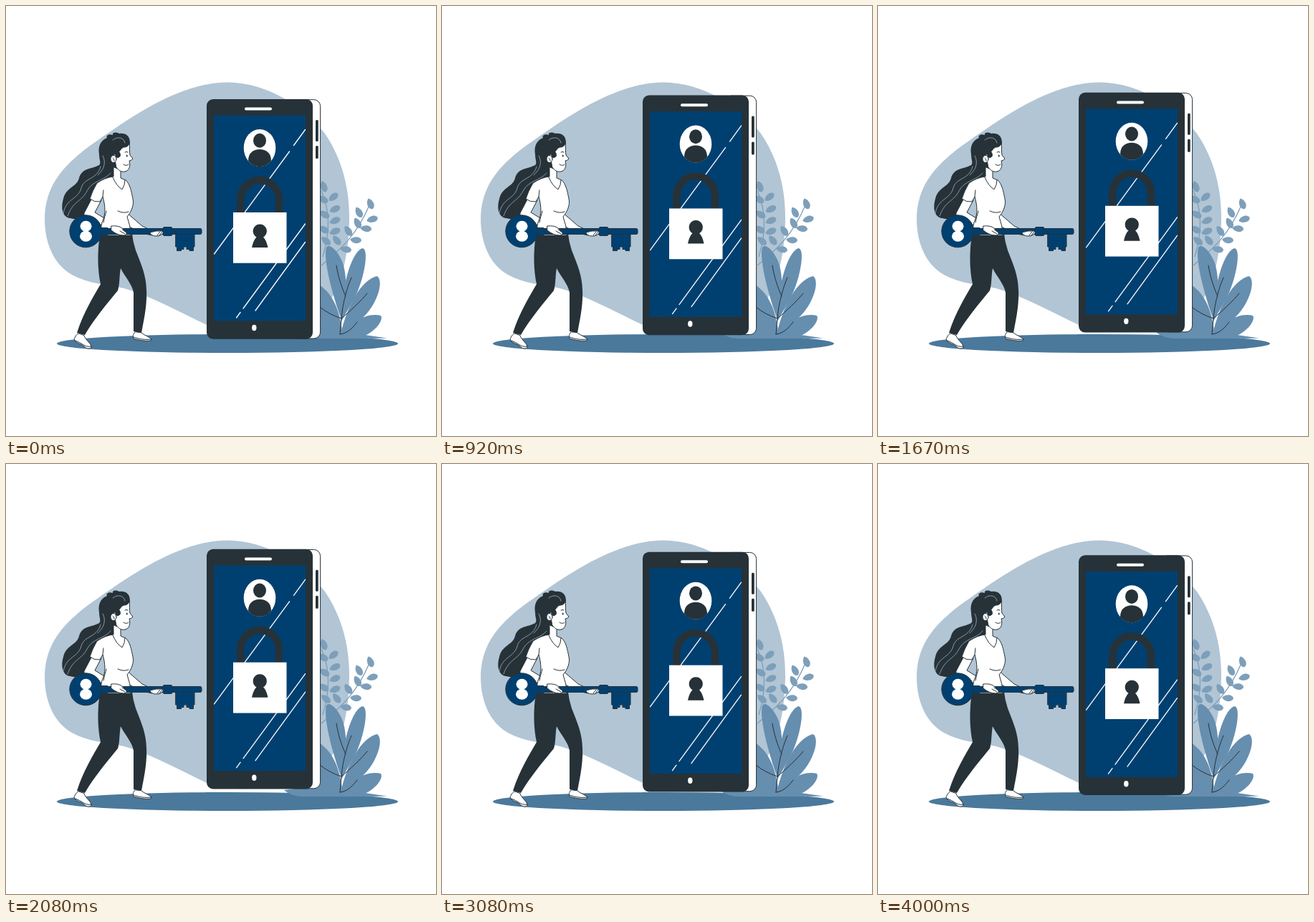
Write an HTML page that moves like this. It is 600x600 px and loops after 4080 ms.

```html
<!DOCTYPE html>
<html lang="en">
<head>
<meta charset="utf-8">
<title>Phone lock</title>
<style>
html, body { margin: 0; width: 100%; height: 100%; overflow: hidden; background: #fff; }
svg { display: block; width: 100%; height: 100%; }
.ink { fill: #263238; }
.navy { fill: #004071; }
.white { fill: #fff; }
.line { fill: none; stroke: #263238; stroke-width: 1; stroke-linecap: round; stroke-linejoin: round; }
.edge { stroke: #263238; stroke-width: 1; stroke-linejoin: round; stroke-linecap: round; }
.leaf { fill: #668eaf; }
.fern { fill: #7d9fba; }
.stem { fill: none; stroke: #7d9fba; stroke-width: 1.3; }
.strand { fill: none; stroke: #b1c5d5; stroke-width: .7; stroke-linecap: round; }
.glare { fill: none; stroke: #fff; stroke-width: 1.3; stroke-linecap: round; }
</style>
</head>
<body>
<svg viewBox="0 0 600 600">
  <path fill="#b1c5d5" d="M54 297C54 247 86 216 130 186C185 147 247 107 309 106.500C365 107 415 140 445 178C470 215 479 255 479 297C478 345 470 395 440 428C400 452 320 462 278 444C240 426 205 406 165 394C140 388 115 388 92 375C66 360 54 330 54 297Z"/>
  <ellipse cx="309" cy="471" rx="238" ry="13" fill="#4a799c"/>

  <g id="fern">
    <path class="stem" d="M440 258Q458 298 442 350M440 362C470 337 490 318 507 278"/>
  </g>
  <g class="leaf">
    <path d="M447 337C443 350 451 390 468 438C475 420 478 375 468 354C461 340 451 331 447 337Z"/>
    <path d="M468 440C467 400 480 345 497 338C508 338 499 385 486 408Z"/>
    <path d="M467 458C478 410 500 380 518 377C529 385 515 425 490 441Z"/>
    <path d="M466 462C480 440 505 427 523 432C528 440 510 460 490 463Z"/>
    <path d="M430 385C450 395 466 415 470 462L430 463Z"/>
    <path d="M388 455Q398 464 415 464L500 464L532 463.500L480 456L440 448Z"/>
  </g>
  <path class="line" d="M466 458L468 436C470 412 477 390 482 379M461 362C463 376 468 392 474 405M438 420Q450 430 468 436C480 426 495 412 504 401M466 458C478 457 486 446 490 441"/>

  <g id="phone">
    <rect class="white edge" x="395" y="130.700" width="43.600" height="333.300" rx="9"/>
    <rect class="ink" x="280" y="130" width="148" height="334.700" rx="9"/>
    <rect class="ink" x="432" y="159" width="3.800" height="30" rx="1.500"/>
    <rect class="ink" x="432" y="195" width="3.800" height="18" rx="1.500"/>
    <rect class="navy" x="290" y="152.700" width="128" height="286.600"/>
    <rect class="white" x="333" y="141.600" width="38" height="4" rx="2"/>
    <ellipse class="white" cx="346.300" cy="449" rx="3.200" ry="4.200"/>
    <path class="glare" d="M417.500 172.500L401.500 194.500M395.500 203L290.500 346M417.500 304L331 422M327 427.500L321.500 435M417.500 329.500L348 425"/>
    <ellipse class="white" cx="354" cy="198" rx="22.300" ry="26"/>
    <ellipse class="ink" cx="354" cy="187.700" rx="9" ry="10"/>
    <path class="ink" d="M338 216C338 205 345 200 354 200S370 205 370 216C366 221.500 360 224 354 224S342 221.500 338 216Z"/>
    <path fill="none" stroke="#263238" stroke-width="10.500" d="M327.300 290V270a26.800 27 0 0 1 53.600 0V290"/>
    <rect class="white" x="317" y="288" width="74.500" height="70.700"/>
    <path class="ink" d="M349.500 322.500A9.600 9.600 0 1 1 359 322.500Q363.500 327 365.500 337H343Q345 327 349.500 322.500Z"/>
  </g>

  <g id="woman">
    <path class="ink" d="M173 191C173 181 167 177 158 178C152 175 148 177 149 180C143 178 139 181 141 184C132 187 128 197 130 207C130 215 133 219 130 222C118 228 106 226 102 240C99 253 84 252 80 269C76 283 79 294 89 296C98 298 105 298 111 293C120 286 123 265 134 252C143 245 152 240 154 226L151 208C160 206 160 198 165 198C170 198 173 196 173 191Z"/>
    <path class="strand" d="M132 224C127 243 109 239 105 254C101 270 84 268 80 289M146 233C137 244 121 243 113 258C106 273 93 272 86 293M149 187C156 181 165 184 166 191M135 209C140 218 137 228 128 236"/>

    <path class="white edge" d="M120 268L109 289Q108 293 114 296L150 314L155 307L124 288L133 271Z"/>
    <path class="white edge" d="M168 288L190 307L207 315L204 320L190 317L164 304Z"/>

    <path class="ink" d="M131 319C127 345 128 370 132 388C121 407 108 428 99 456L110 459C122 438 142 414 156 397C159 388 158 375 160 366C166 378 176 388 178 400L178 454L189 456C193 435 198 413 195.500 389C194 371 186 354 181 341Q177 329 176 318Z"/>
    <path class="white edge" d="M101 457C97 459 96 463 95 465C97 471 106 471 110 476C113 478.500 117 478.500 119 477C120 471 111 467 109 460Z"/>
    <path class="line" d="M96 467C106 469 109 477 119 475"/>
    <path class="white edge" d="M180 455C177 458 177 461 178 464C184 466 194 468 202 467C205 463 195 461 189 456Z"/>
    <path class="line" d="M178 462C186 465 195 466 203 465"/>

    <path class="white edge" d="M150 225V238Q139 239 127 247Q120 259 117 269Q123 274 131 273L135 266C139 280 139 291 134 302L130 320H174Q174 307 169 294C175 287 179 277 177 269C175 259 173 248 167 243L160 240V229Z"/>
    <path class="line" d="M149 239Q154 251 162 256Q166 250 166 243M135 266L136 257M156 286Q164 290 171 287M140 286Q137 296 136 302"/>
    <path class="white edge" d="M151 207C159 206 160 197 165 197Q170 197 172 192C173 197 172 204 173 208L177 213Q175 216 172 216C174 223 172 230 166 231C160 232 157 229 154 225Z"/>
    <ellipse class="white edge" cx="150" cy="213.500" rx="4" ry="5"/>
    <path class="ink" d="M151 203Q160 200 160 209Q157 214 153 211Z"/>
    <path class="line" d="M166 204Q168 202.500 170 204M164 221Q168 224 171 221M149 212Q151 213 151 216"/>
    <ellipse class="ink" cx="168.700" cy="209" rx="1" ry="1.600"/>

    <g class="navy edge">
      <path d="M128 310.500H271Q273 310.500 273 312.500V316.500Q273 318.500 271 318.500H128Z"/>
      <path d="M237 318.500H263V336H261.500V341.500H256V339.500H252V336H248V339.500H244.500V341.500H238.500V336H237Z"/>
      <rect x="219" y="308.500" width="13" height="12" rx="2"/>
      <rect x="129" y="309.500" width="14" height="10" rx="2"/>
      <circle cx="111.300" cy="314.300" r="22.500"/>
    </g>
    <ellipse class="white" cx="111.500" cy="307.300" rx="8" ry="7.500"/>
    <ellipse class="white" cx="111.500" cy="321.300" rx="8.500" ry="7.500"/>

    <path class="white edge" d="M147 307Q157 306 162 310L168 316Q169 320 164 320Q155 320 147 313Z"/>
    <path class="line" d="M159 314L166 318M162 312L168 316"/>
    <path class="white edge" d="M201 316Q209 313 218 314Q221 316 217 319Q211 323 203 319.500Z"/>
    <path class="line" d="M211 320L215 315M214 320L218 315"/>
  </g>
</svg>
<script>
const LOOP = 4080, FPS = 12;
const PEAK = 26.2, LIFT = 11.7, RISE = 0.41;

// x, y, tilt of each fern leaflet
const leaflets = [
  [443, 252, 75], [457, 267, -35], [442, 270, 35], [459, 284, -22],
  [444, 291, 35], [459, 300, -18], [443, 312, 35], [459, 315, -18],
  [446, 328, 45], [508, 276, 72], [511, 298, -12], [492, 288, 65],
  [502, 311, 10], [490, 303, 65], [488, 327, 8], [477, 314, 60],
  [474, 340, 12], [461, 327, 55]
];
const fern = document.getElementById('fern');
for (const [x, y, tilt] of leaflets) {
  const el = document.createElementNS('http://www.w3.org/2000/svg', 'path');
  el.setAttribute('class', 'fern');
  el.setAttribute('d', 'M-8 0C-4 -6 6 -7 8 -1C7 5 -3 6 -8 0Z');
  el.setAttribute('transform', `translate(${x} ${y}) rotate(${tilt})`);
  fern.append(el);
}

const phone = document.getElementById('phone');

// The phone rests for one step, then floats up and back down at a steady pace.
function offset(step) {
  return step === 0 ? 0 : RISE * Math.abs(step - PEAK) - LIFT;
}

const start = performance.now();
function draw(now) {
  const t = Math.max(0, now - start) % LOOP;
  const step = Math.floor((t + 4) * FPS / 1000);
  phone.setAttribute('transform', `translate(0 ${offset(Math.min(step, 48)).toFixed(2)})`);
  requestAnimationFrame(draw);
}
draw(start);
</script>
</body>
</html>
```
